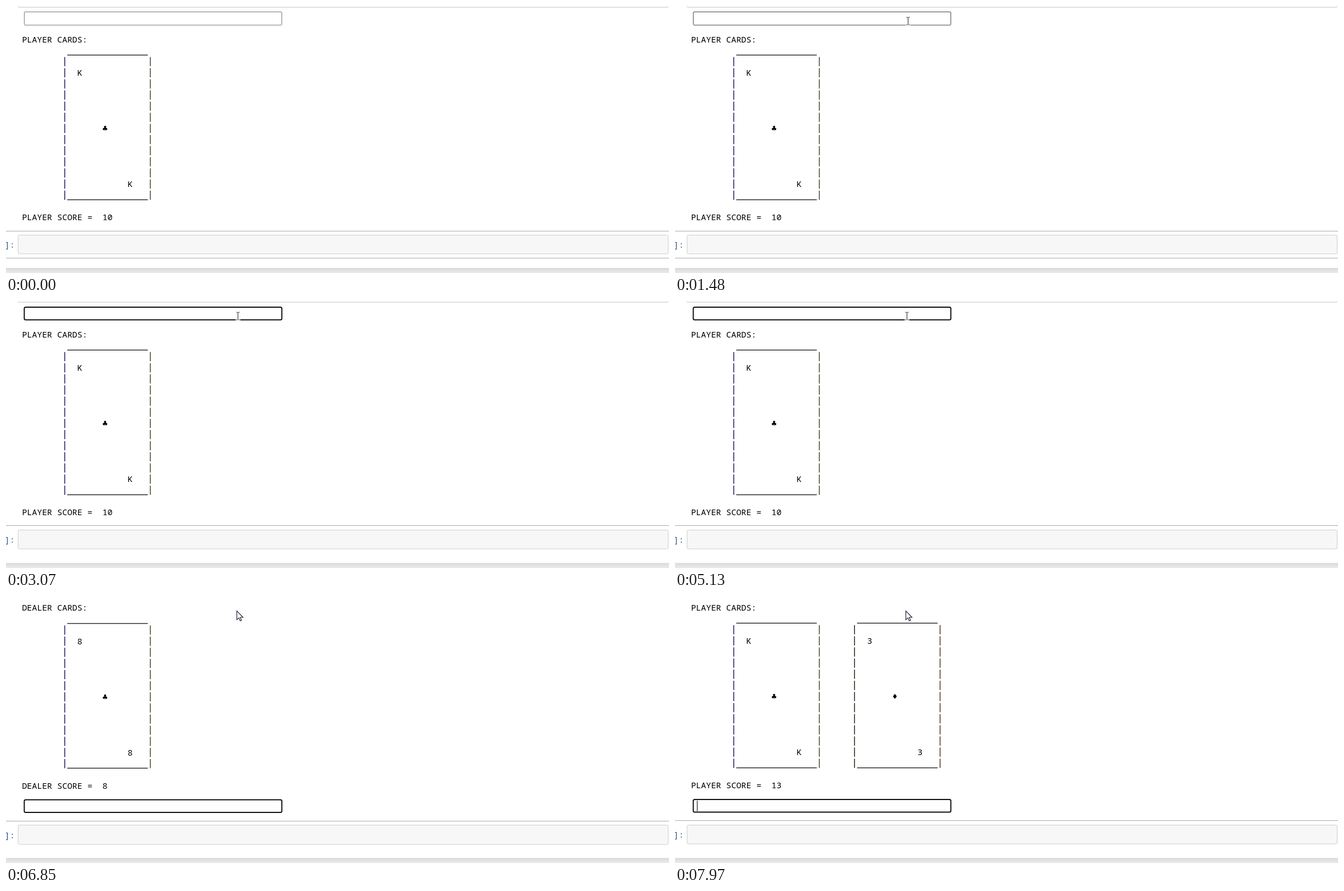
An HTML page for the animation above (8000 ms loop, 1179 by 475 pixels).

```html
<!DOCTYPE html>
<html lang="en">
<head>
<meta charset="utf-8">
<title>Card game notebook</title>
<style>
  html, body { margin: 0; width: 100%; height: 100%; overflow: hidden; background: #fff; }
  svg { display: block; width: 1179px; height: 475px; }
  text { font: 14.92px "Noto Sans Mono", "DejaVu Sans Mono", monospace; white-space: pre; }
  .suit { font-family: "DejaVu Sans Mono", monospace; }
</style>
</head>
<body>
<svg id="stage" viewBox="0 0 1179 475" xmlns="http://www.w3.org/2000/svg">
  <defs>
    <linearGradient id="shade" x1="0" y1="0" x2="0" y2="1">
      <stop offset="0" stop-color="#dadada"/>
      <stop offset="1" stop-color="#eaeaea"/>
    </linearGradient>
  </defs>
  <rect width="1179" height="475" fill="#fff"/>
  <rect id="topCell" x="21.5" y="-30" width="1156" height="32.5" rx="2" fill="#f7f7f7" stroke="#cfcfcf"/>
  <g id="pages"></g>
  <rect id="field" x="32.5" width="458" fill="#fff"/>
  <rect id="caret" x="39" width="1" height="19" fill="#000"/>
  <rect id="divider" width="1179" height="1" fill="#ababab"/>
  <rect id="cellEnd" y="448" width="1179" height="1" fill="#ababab"/>
  <rect id="cell" x="21.5" y="407.5" width="1156" rx="2" fill="#f7f7f7" stroke="#cfcfcf"/>
  <text id="prompt" x="-2.2">]:</text>
  <rect y="466" width="1179" height="9" fill="url(#shade)"/>
  <path id="arrow" d="M0 0V15.6L3.6 12.2L6 17.6L8.4 16.6L6 11.3H11Z" fill="#fff" stroke="#15152a" stroke-width="1.1"/>
  <g id="beam" fill="none">
    <path d="M-4 7H4" stroke="#fff" stroke-width="3"/>
    <path d="M-3 -6.5H-1L0 -5.5L1 -6.5H3M0 -5.5V6M-3 7H-1L0 6L1 7H3" stroke="#222"/>
  </g>
</svg>
<script>
const LOOP = 8000, COL = 8.95, ROW = 19.8, LEFT = 28.4;
const $ = id => document.getElementById(id);
const colX = c => LEFT + c * COL;

function add(parent, tag, attrs, text) {
  const el = document.createElementNS("http://www.w3.org/2000/svg", tag);
  set(el, attrs);
  if (text) el.textContent = text;
  parent.appendChild(el);
  return el;
}

function set(el, attrs) {
  for (const k in attrs) el.setAttribute(k, attrs[k]);
}

function show(el, on) {
  el.style.display = on ? "" : "none";
}

function write(g, row, col, text, cls = "") {
  add(g, "text", { x: colX(col), y: 64.6 + row * ROW, class: cls }, text);
}

function drawCard(g, shift, rank, suit, colors) {
  const rule = row => add(g, "rect", {
    x: colX(shift + 9), y: 87 + (row - 1) * ROW - 0.3, width: 16 * COL, height: 1.2
  });
  rule(1);
  rule(14);
  for (let row = 2; row <= 14; row++) {
    [8, 25].forEach((c, i) => add(g, "rect", {
      x: colX(shift + c + 0.5) - 0.75, y: 51.2 + row * ROW,
      width: 1.5, height: 16.4, fill: colors[i]
    }));
  }
  write(g, 3, shift + 11, rank);
  write(g, 8, shift + 16, suit, "suit");
  write(g, 13, shift + 21, rank);
}

function makePage(who, score, dy, cards) {
  const g = add($("pages"), "g", { transform: `translate(0 ${dy})` });
  write(g, 0, 0, who + " CARDS:");
  cards.forEach(([rank, suit], i) =>
    drawCard(g, i * 24, rank, suit, i ? ["#2c2214", "#4c3a1c"] : ["#1c1a5c", "#45452c"]));
  write(g, 16, 0, `${who} SCORE =  ${score}`);
  return g;
}

const pages = [
  makePage("PLAYER", 10, 0, [["K", "♣"]]),
  makePage("DEALER", 8, -38.4, [["8", "♣"]]),
  makePage("PLAYER", 13, -39, [["K", "♣"], ["3", "♦"]])
];

const caretFlips = [2540, 3070, 3600, 4080, 4670, 5130, 5260, 5790, 6320, 6850, 7380, 7920, 7970];

// Pointer position, refreshed in discrete steps as in a screen recording.
function pointer(t) {
  if (t < 590) return null;
  if (t < 1070) {
    const k = Math.min(3, Math.floor((t - 590) / 66.6));
    const left = (1 - k / 3) ** 1.6;
    return [452 + 529 * left, 65 + 391 * left];
  }
  if (t < 2870) {
    const k = Math.min(7, 1 + Math.floor((t - 1070) / 68.3));
    const left = (1 - k / 7) ** 1.5;
    return [414 + 38 * left, 26 + 39 * left];
  }
  return [412, 26];
}

function draw(t) {
  const page = t < 5260 ? 0 : t < 7970 ? 1 : 2;
  const focused = t >= 2470;
  const low = t < 2670 || page === 1;
  const fieldY = [0, 351.5, 351][page];
  const p = pointer(t);
  const overField = page === 0 && p && p[1] < 35;

  pages.forEach((g, i) => show(g, i === page));
  show($("topCell"), page === 0);

  set($("field"), {
    y: 10.5 + fieldY + (focused ? 0.5 : 0),
    height: focused ? 22.5 : 23.5,
    rx: focused ? 2.5 : 1.5,
    stroke: focused ? "#101010" : overField ? "#444" : "#767676",
    "stroke-width": focused ? 2 : 1
  });
  set($("caret"), { y: page ? 364 : 13 });
  show($("caret"), caretFlips.filter(f => t >= f).length % 2);

  set($("divider"), { y: low ? 400 : 399 });
  show($("cellEnd"), t < 2670);
  set($("cell"), { height: page === 1 ? 34.5 : 33.5 });
  set($("prompt"), { y: page === 1 ? 430.6 : 430, fill: page === 1 ? "#24429a" : "#2b5478" });

  show($("arrow"), p && !overField);
  show($("beam"), overField);
  if (p) {
    const [x, y] = p.map(Math.round);
    set($("arrow"), { transform: `translate(${page ? 410.5 : x + 0.5} ${y + 0.7})` });
    set($("beam"), { transform: `translate(${x + 0.5} ${y + 0.5})` });
  }
}

function tick() {
  draw(performance.now() % LOOP);
  requestAnimationFrame(tick);
}
tick();
</script>
</body>
</html>
```
